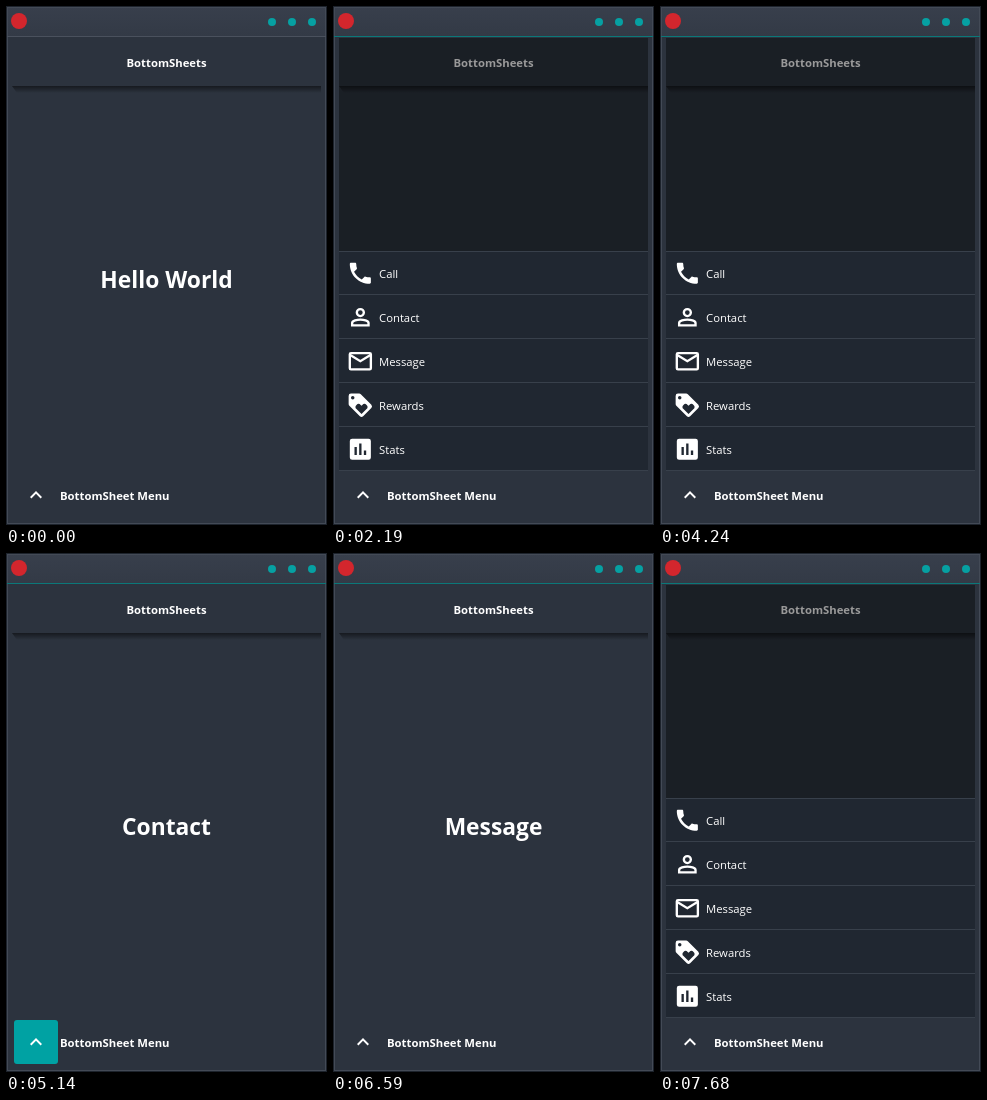
These frames come from a looping animation (321 px wide and 519 px high, 8000 ms). An HTML page:

```html
<!DOCTYPE html>
<html lang="en">
<head>
<meta charset="utf-8">
<title>BottomSheets</title>
<style>
  html, body { margin: 0; width: 100%; height: 100%; overflow: hidden; background: #2c333e; }
  svg { display: block; width: 321px; height: 519px; }
  text { font-family: "Open Sans", "Noto Sans", sans-serif; fill: #fff; }
  .bold { font-weight: 700; font-size: 11.3px; }
  .mid { text-anchor: middle; }
  #label { font-size: 22.8px; }
  .row text { font-size: 11.3px; }
  .fill { fill: #fff; fill-rule: evenodd; }
  .line { fill: none; stroke: #fff; stroke-width: 2; }
</style>
</head>
<body>
<svg viewBox="0 0 321 519">
  <defs>
    <linearGradient id="bar" x2="0" y2="1">
      <stop stop-color="#383f4c"/><stop offset="1" stop-color="#333a46"/>
    </linearGradient>
    <linearGradient id="shade" x2="0" y2="1">
      <stop stop-color="#000" stop-opacity=".5"/><stop offset="1" stop-color="#000" stop-opacity="0"/>
    </linearGradient>
    <clipPath id="page"><rect x="6" y="32" width="309" height="432"/></clipPath>
  </defs>

  <rect width="321" height="519" fill="#2c333e"/>
  <rect width="321" height="30" fill="url(#bar)"/>
  <rect x="1.5" y="1.5" width="318" height="516" fill="none" stroke="#434a56"/>
  <rect x=".5" y=".5" width="320" height="518" fill="none" stroke="#1d232c"/>
  <rect id="rule" x="1" y="30" width="319" height="1"/>
  <circle cx="13" cy="15" r="8" fill="#d3262d"/>
  <g fill="#06a0a2">
    <circle cx="266" cy="16" r="4"/><circle cx="286" cy="16" r="4"/><circle cx="306" cy="16" r="4"/>
  </g>

  <text class="bold mid" x="160.5" y="61">BottomSheets</text>
  <path d="M6 80H315V87H11Z" fill="url(#shade)"/>
  <text id="label" class="bold mid" x="160.5" y="282"></text>

  <g clip-path="url(#page)">
    <rect id="dim" x="6" y="32" width="309" height="432" fill="#000" opacity=".4"/>
    <g id="sheet">
      <rect x="6" width="309" height="220" fill="#202731"/>
      <g id="rows"></g>
      <g id="scroll">
        <rect x="299" width="16" height="220" fill="#1f252f"/>
        <path id="arrows" class="line"/>
      </g>
    </g>
  </g>
  <rect id="edge" x="6" y="464" width="309" height="1" fill="#38404b"/>

  <rect id="button" x="8" y="467" width="44" height="44" rx="3"/>
  <path class="fill" transform="translate(18 477)" d="M7.41 15.41 12 10.83l4.59 4.58L18 14l-6-6-6 6z"/>
  <text class="bold" x="54" y="494">BottomSheet Menu</text>
</svg>
<script>
const LOOP = 8000, FULL = 219, BASE = 464, PEEK = 15;
const el = id => document.getElementById(id);

const items = [
  ["Call", '<path class="fill" d="M6.62 10.79c1.44 2.83 3.76 5.14 6.59 6.59l2.2-2.2c.27-.27.67-.36 1.02-.24 1.12.37 2.33.57 3.57.57.55 0 1 .45 1 1V20c0 .55-.45 1-1 1C10.6 21 3 13.4 3 4c0-.55.45-1 1-1h3.5c.55 0 1 .45 1 1 0 1.25.2 2.45.57 3.57.11.35.03.74-.25 1.02z"/>'],
  ["Contact", '<circle class="line" cx="12" cy="8" r="3"/><path class="line" d="M5 19v-2c0-2 4.3-3 7-3s7 1 7 3v2z"/>'],
  ["Message", '<rect class="line" x="3" y="5" width="18" height="14" rx="1"/><path class="line" d="M3 6.5 12 12l9-5.5"/>'],
  ["Rewards", '<path class="fill" d="M21.4 11.6l-9-9Q11.8 2 11 2H4Q2 2 2 4v7q0 .8.6 1.4l9 9q1.4 1.2 2.8 0l7-7q1.2-1.4 0-2.8zM4 5.5a1.5 1.5 0 1 0 3 0a1.5 1.5 0 1 0-3 0zM17.3 15.3 13 19.5l-4.3-4.2A2.5 2.5 0 0 1 12.3 11.7l.7.8.7-.8a2.5 2.5 0 0 1 3.6 3.6z"/>'],
  ["Stats", '<path class="fill" d="M5 3H19Q21 3 21 5V19Q21 21 19 21H5Q3 21 3 19V5Q3 3 5 3zM7 10v7h2v-7zM11 7v10h2V7zM15 13v4h2v-4z"/>']
];
el("rows").innerHTML = items.map(([name, icon], i) => `
  <g class="row" transform="translate(0 ${44 * i})">
    <rect x="6" y="${i ? -1 : 0}" width="309" height="1" fill="#38404b"/>
    <g transform="translate(13.3 8.2) scale(1.17)">${icon}</g>
    <text x="46" y="27">${name}</text>
  </g>`).join("");

// One visit to the menu: hover, press, sheet rises in steps, pointer leaves, item chosen.
const visits = [
  { hover: 610, press: 1350, rise: 290, steps: 5, leave: 2190, pick: 2830, before: "Hello World" },
  { hover: 3460, press: 3730, rise: 290, steps: 4, leave: 4240, pick: 4740, before: "Call" },
  { hover: 5140, press: 5440, rise: 290, steps: 5, leave: 5920, pick: 6590, before: "Contact" },
  { hover: 6890, press: 7250, rise: 250, steps: 5, leave: 7680, pick: LOOP, before: "Message" }
];

function sheetHeight(v, t) {
  const first = v.rise === 290 ? 70 : 50;
  const age = t - v.press;
  if (age < first) return 0;
  const gap = (v.rise - first) / (v.steps - 1);
  const step = Math.min(v.steps - 1, Math.floor((age - first) / gap + 1e-6));
  return Math.round(PEEK + (FULL - PEEK) * step / (v.steps - 1));
}

function chevron(y, dir) {
  return `M303.5 ${y + 2 * dir}L307 ${y - 2 * dir}L310.5 ${y + 2 * dir}`;
}

function render(t) {
  const v = visits.find(visit => t < visit.pick);
  const height = sheetHeight(v, t);
  const open = height > 0;
  const hovered = t >= v.hover && t < v.leave;
  const pressed = t >= v.press && !open;

  el("label").textContent = v.before;
  el("rule").setAttribute("fill", t < 1350 ? "#4a515d" : "#0b7879");
  el("button").setAttribute("fill", !hovered ? "none" : pressed ? "#0e7f81" : "#00a2a3");
  for (const id of ["dim", "sheet", "edge"]) el(id).style.display = open ? "" : "none";
  el("sheet").setAttribute("transform", `translate(0 ${BASE - height})`);
  el("scroll").style.display = height < FULL ? "" : "none";
  const inset = Math.min(8, height / 2);
  el("arrows").setAttribute("d", chevron(inset, 1) + chevron(height - inset, -1));
}

const start = performance.now();
function tick() {
  render((performance.now() - start) % LOOP);
  requestAnimationFrame(tick);
}
render(0);
requestAnimationFrame(tick);
</script>
</body>
</html>
```
